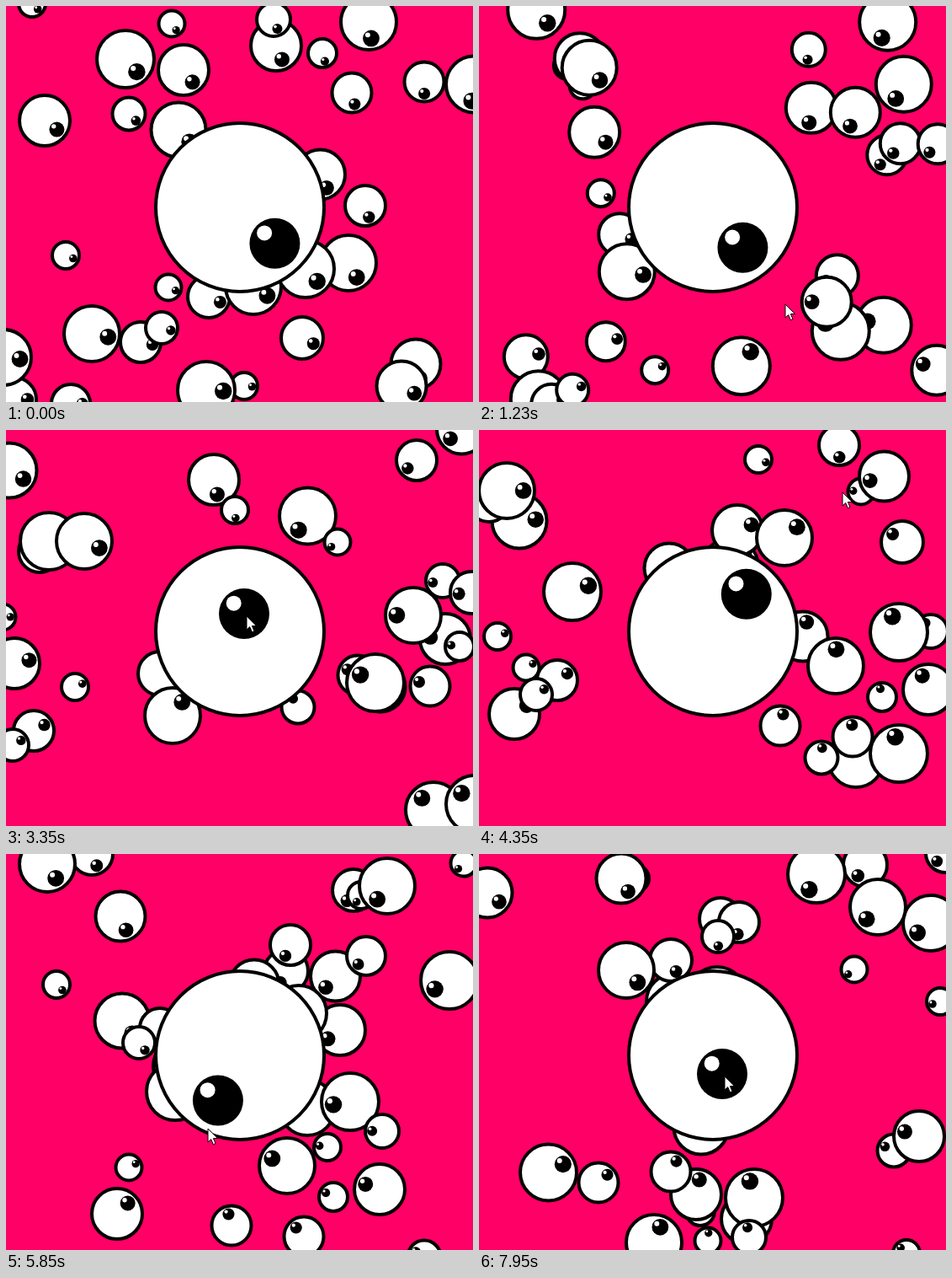
Recreate the animation shown at these times as an HTML page with a canvas. Size 555x470 px, loop 8 s.

```html
<!DOCTYPE html>
<html lang="en">
<head>
<meta charset="utf-8">
<title>Watching eyes</title>
<style>
  html, body { margin: 0; width: 100%; height: 100%; overflow: hidden; background: #ff0066; }
  canvas { display: block; }
</style>
</head>
<body>
<canvas id="stage" width="555" height="470"></canvas>
<script>
const ctx = document.getElementById('stage').getContext('2d');
const LOOP = 8000;
const SPEED = 0.06; // px per ms on each axis
const BOX = { left: -4, right: 558, top: -3, bottom: 478.5 };
const MAIN = { x: 278, y: 239, r: 100 };

// x, y, radius and heading (x sign, y sign), back to front
const EYES = [
  [556.5, 93, 33.5, '+-'], [283, 451, 16, '-+'], [193, 334, 15.5, '+-'],
  [197, 21, 15.5, '-+'], [31, -3, 16, '++'], [407, 305, 33, '++'],
  [321, 47, 30, '++'], [146, 128, 19.5, '++'], [10, 467, 26, '-+'],
  [376, 56, 17, '++'], [211, 76, 30, '-+'], [411, 103, 23.5, '++'],
  [427, 237, 24, '+-'], [373.5, 200, 29.5, '+-'], [77, 472, 23, '+-'],
  [46, 136, 30, '+-'], [205, 147, 32.5, '--'], [241, 345, 25, '--'],
  [142, 63, 34, '--'], [294, 333, 33, '--'], [356, 312, 34, '++'],
  [318, 16, 20, '+-'], [352, 394, 25, '+-'], [71, 296, 16, '+-'],
  [102, 389, 33, '+-'], [-3, 417, 33, '++'], [160, 399, 24, '-+'],
  [185, 382, 19, '-+'], [497, 90, 23.5, '++'], [487, 425, 29.5, '--'],
  [470, 451, 29.5, '++'], [431, 19, 33, '++'], [238, 456, 34, '++']
].map(([x, y, r, dir]) => ({ x, y, r, dx: +(dir[0] + 1), dy: +(dir[1] + 1) }));

// time, pointer tip x, y
const POINTER = [
  [0, 503, 471], [1230, 364, 354], [2170, 199, 289], [3350, 286, 221],
  [4350, 432, 74], [5850, 240, 326], [7950, 292, 264]
];

const TICKS = [70, 910, 1770, 2630, 3490, 4350, 5210, 6070, 6950, 7790];

// The picture advances in short bursts of 80 ms steps
function stepTime(t) {
  const start = TICKS.filter(s => s <= t).pop();
  return start === undefined ? 0 : start + 80 * Math.min(10, Math.floor((t - start) / 80));
}

function bounce(p, lo, hi) {
  const span = hi - lo;
  const q = (((p - lo) % (2 * span)) + 2 * span) % (2 * span);
  return lo + (q > span ? 2 * span - q : q);
}

function slope(i, axis) {
  const a = POINTER[Math.max(0, i - 1)];
  const b = POINTER[Math.min(POINTER.length - 1, i + 1)];
  return (b[axis] - a[axis]) / (b[0] - a[0]);
}

// Smooth Hermite path through the pointer's stops
function pointerAt(t) {
  let i = 0;
  while (i < POINTER.length - 2 && POINTER[i + 1][0] <= t) i++;
  const a = POINTER[i], b = POINTER[i + 1];
  const h = b[0] - a[0], u = Math.min(1, (t - a[0]) / h);
  const at = k => {
    const w = u * u * (3 - 2 * u);
    return a[k] + (b[k] - a[k]) * w +
      h * u * (1 - u) * ((1 - u) * slope(i, k) - u * slope(i + 1, k));
  };
  return { x: at(1), y: at(2) };
}

function disc(x, y, r, fill) {
  ctx.beginPath();
  ctx.arc(x, y, r, 0, Math.PI * 2);
  ctx.fillStyle = fill;
  ctx.fill();
}

function drawEye(x, y, r, look) {
  disc(x, y, r, '#fff');
  ctx.lineWidth = 4;
  ctx.strokeStyle = '#000';
  ctx.stroke();
  const dx = look.x - x, dy = look.y - y;
  const dist = Math.hypot(dx, dy) || 1;
  const k = Math.min(dist, r * 0.595) / dist;
  const px = x + dx * k, py = y + dy * k, pr = r * 0.3;
  disc(px, py, pr, '#000');
  disc(px - pr * 0.41, py - pr * 0.41, pr * 0.3, '#fff');
}

function drawPointer({ x, y }) {
  const pts = [[0, 0], [0, 16], [3.7, 12.6], [6.4, 18.8], [9, 17.6], [6.4, 11.6], [11.4, 11.4]];
  ctx.beginPath();
  pts.forEach(([a, b]) => ctx.lineTo(x + a, y + b));
  ctx.closePath();
  ctx.fillStyle = '#fff';
  ctx.fill();
  ctx.lineWidth = 1;
  ctx.strokeStyle = '#000';
  ctx.stroke();
}

function draw(t) {
  ctx.fillStyle = '#ff0066';
  ctx.fillRect(0, 0, 555, 470);
  const tip = pointerAt(t);
  const look = { x: tip.x - 3, y: tip.y - 3 };
  const d = SPEED * t;
  for (const e of EYES) {
    drawEye(bounce(e.x + e.dx * d, BOX.left, BOX.right),
            bounce(e.y + e.dy * d, BOX.top, BOX.bottom), e.r, look);
  }
  drawEye(MAIN.x, MAIN.y, MAIN.r, look);
  drawPointer(tip);
}

const begin = performance.now();
function tick() {
  draw(stepTime((performance.now() - begin) % LOOP));
  requestAnimationFrame(tick);
}
tick();
</script>
</body>
</html>
```
